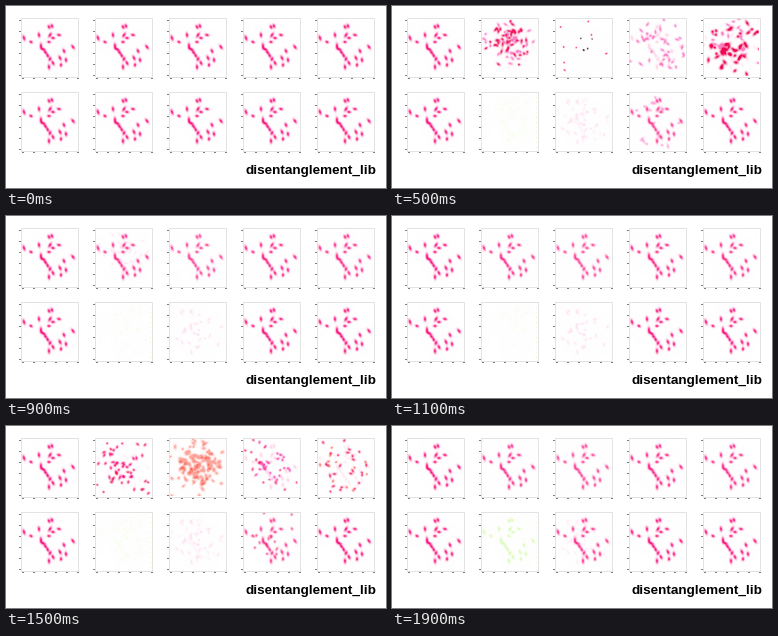
Recreate the animation shown at these times as a matplotlib script. Size 380 by 182 pixels, loop 2000 ms.

```python
import numpy as np
import matplotlib.pyplot as plt
from matplotlib.animation import FuncAnimation

W, H, DPI = 380, 182, 100
FRAMES, INTERVAL = 20, 100
PW, PH = 56, 58
PITCH, LEFT, TOP = 74, 15, 12

PINK = (250, 20, 125)
ROSE = (246, 50, 165)
CRIMSON = (240, 8, 85)
ORANGE = (250, 75, 55)
GREEN = (190, 250, 130)
DARK = (50, 40, 50)

YY, XX = np.mgrid[0:PH, 0:PW] + 0.5


def strokes(points, sizes, angles, thick):
    """Soft elongated blobs summed into one coverage map."""
    out = np.zeros((PH, PW))
    for (x, y), size, a in zip(points, sizes, angles):
        u = (XX - x) * np.cos(a) + (YY - y) * np.sin(a)
        v = (YY - y) * np.cos(a) - (XX - x) * np.sin(a)
        out += np.exp(-0.5 * ((u / size) ** 2 + (v / thick) ** 2))
    return np.clip(out, 0, 1)


def resting():
    rng = np.random.default_rng(2)
    marks = [(28, 9), (31, 8), (3, 20), (10, 24), (18, 17), (29, 17),
             (32, 20), (28, 24), (38, 17), (28, 49), (32, 45), (40, 47),
             (45, 42), (39, 40), (43, 33), (52, 29)]
    chain = np.column_stack([np.linspace(20, 29, 5), np.linspace(28, 41, 5)])
    points = np.vstack([marks, chain])
    n = len(points)
    return strokes(points, rng.uniform(1.2, 2.1, n),
                   np.radians(rng.normal(60, 30, n)), 0.95)


def scatter(seed, n, spread=None, size=1.4, thick=0.85):
    """Random strokes: a cloud round the middle, or all over the panel."""
    rng = np.random.default_rng(seed)
    if spread:
        points = rng.normal((29, 27), spread, (n, 2))
    else:
        points = rng.uniform((2, 2), (PW - 2, PH - 2), (n, 2))
    return strokes(points, size * rng.uniform(0.6, 1.3, n),
                   rng.uniform(0, np.pi, n), thick)


# Strength rules: s swings 0, 1, 0, -1 over the loop; t turns 0, 1, 0
def fade(rate):
    return lambda s, t: np.exp(-rate * s * s)


def rise(power, peak):
    return lambda s, t: peak * max(s, 0) ** power


def fall(power, peak):
    return lambda s, t: peak * max(-s, 0) ** power


def turn_fade(rate, peak=1):
    return lambda s, t: peak * np.exp(-rate * t)


def turn_rise(peak):
    return lambda s, t: peak * (1 - np.exp(-40 * t))


rest = resting()
still = [(rest, PINK, fade(0))]
rim = np.zeros((PH, PW))
rim[0, ::3] = rim[::5, 0] = rim[::5, -1] = 1

PANELS = [
    still,
    [(rest, PINK, fade(3)),
     (scatter(3, 40, 12), ROSE, rise(1.2, 0.6)),
     (scatter(5, 42, 12), CRIMSON, rise(4, 0.9)),
     (scatter(8, 26, 8), PINK, fall(4, 0.9)),
     (scatter(9, 26, size=1.1), CRIMSON, fall(4, 0.8))],
    [(rest, PINK, fade(6)),
     (scatter(12, 5, 5, 0.7, 0.6), DARK, rise(4, 0.9)),
     (scatter(11, 8, size=0.7, thick=0.6), CRIMSON, rise(2, 0.8)),
     (scatter(13, 90, 12, 1.5, 1.1), ORANGE, fall(3, 0.5)),
     (scatter(14, 50, 13), ORANGE, fall(3, 0.5))],
    [(rest, PINK, fade(1.7)),
     (scatter(22, 38, 12), ROSE, rise(4, 0.6)),
     (scatter(24, 26, 9, 1.1), ROSE, fall(2, 0.8)),
     (scatter(25, 12, size=1.1), CRIMSON, fall(4, 0.7))],
    [(rest, PINK, fade(2.5)),
     (scatter(31, 30, 15), ROSE, rise(2, 0.6)),
     (scatter(33, 48, 15, 1.6, 1), CRIMSON, rise(5, 1)),
     (scatter(35, 28, 14, 1.2), CRIMSON, fall(4, 0.8)),
     (scatter(36, 12, size=1.1), ORANGE, fall(4, 0.7))],
    still,
    [(rest, PINK, turn_fade(200)),
     (rest, GREEN, lambda s, t: turn_rise(1)(s, t) * turn_fade(5)(s, t)),
     (scatter(61, 40, 14, 1, 0.6), GREEN, turn_rise(0.12)),
     (rim, GREEN, turn_rise(0.45))],
    [(rest, PINK, turn_fade(6)),
     (scatter(41, 30, 12), ROSE, turn_rise(0.12))],
    [(rest, PINK, fade(0.2)),
     (scatter(51, 16, 14), ROSE, rise(4, 0.4)),
     (scatter(52, 14, 15, 1.1), CRIMSON, fall(4, 0.6))],
    still,
]


def render(layers, s, t):
    img = np.ones((PH, PW, 3))
    for cov, colour, strength in layers:
        absorb = 1 - np.array(colour) / 255
        img *= 1 - strength(s, t) * cov[..., None] * absorb
    return img


fig = plt.figure(figsize=(W / DPI, H / DPI), dpi=DPI, facecolor="white")
ax = fig.add_axes([0, 0, 1, 1])
ax.axis("off")

images = []
for i in range(len(PANELS)):
    row, col = divmod(i, 5)
    left, top = LEFT + PITCH * col, TOP + PITCH * row
    images.append(ax.imshow(np.ones((PH, PW, 3)), interpolation="nearest",
                            extent=(left, left + PW, top + PH, top),
                            aspect="auto"))
    ax.add_patch(plt.Rectangle((left - 0.5, top - 0.5), PW + 1, PH + 1,
                               fill=False, ec="#dedede", lw=0.6, zorder=3))
    for step in range(0, PW, 11):
        x, y = left + 0.5 + step, top + 1.5 + step
        ax.plot([left - 2.5, left - 1.2], [y, y], color="#777777", lw=0.7)
        ax.plot([x, x + 1.2], [top + PH + 1.5] * 2, color="#777777", lw=0.7)
ax.set_xlim(0, W)
ax.set_ylim(H, 0)
ax.text(370, 168.3, "disentanglement_lib", ha="right", va="baseline",
        family="Liberation Sans", weight="bold", size=9.7, color="black")


def update(k):
    phase = 2 * np.pi * k / FRAMES
    s = np.arcsin(np.sin(phase)) * 2 / np.pi
    t = (1 - np.cos(phase)) / 2
    for im, layers in zip(images, PANELS):
        im.set_data(render(layers, s, t))
    return images


anim = FuncAnimation(fig, update, frames=FRAMES, interval=INTERVAL,
                     init_func=lambda: update(0), repeat=True, repeat_delay=0)
plt.show()
```
